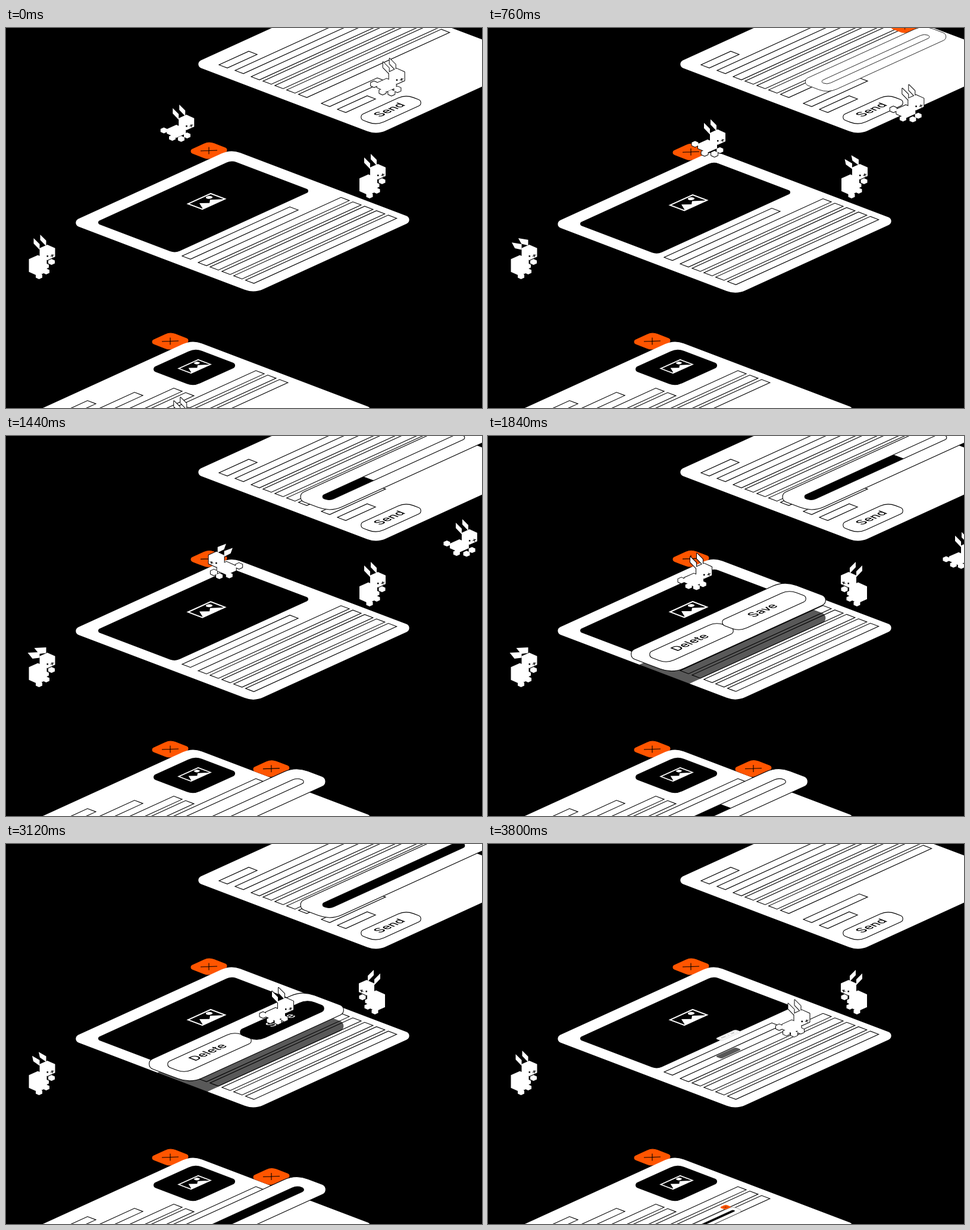
An HTML page with a canvas for the animation above (3.84 s loop, 800 by 640 pixels).

```html
<!DOCTYPE html>
<html lang="en">
<head>
<meta charset="utf-8">
<style>
  html, body { margin: 0; width: 100%; height: 100%; overflow: hidden; background: #000; }
  canvas { display: block; }
</style>
</head>
<body>
<canvas id="stage" width="800" height="640"></canvas>
<script>
const ctx = document.getElementById('stage').getContext('2d');
const LOOP = 3840, STEP = 40, ORANGE = '#ff5500';
// Slopes of the two floor axes: up-right and down-right
const UP = -0.457, DOWN = 0.38;
const TIP = Math.tan((Math.atan(DOWN) - Math.atan(UP)) / 2);

const clamp = v => Math.max(0, Math.min(1, v));
const ramp = (t, a, b) => clamp((t - a) / (b - a));
const easeOut = v => 1 - (1 - v) ** 3;
const mix = (a, b, k) => a + (b - a) * k;
const floor = (a, b) => [a + b, a * UP + b * DOWN];

function paint(path, fill, stroke, width = 1.1) {
  if (fill) { ctx.fillStyle = fill; ctx.fill(path); }
  if (stroke) { ctx.strokeStyle = stroke; ctx.lineWidth = width; ctx.stroke(path); }
}

function at(x, y, scale, draw) {
  ctx.save();
  ctx.translate(x, y);
  ctx.scale(scale, Math.abs(scale));
  draw();
  ctx.restore();
}

function onFloor(x, y, draw) {
  ctx.save();
  ctx.transform(1, UP, 1, DOWN, x, y);
  draw();
  ctx.restore();
}

// Rounded floor rectangle around (x, y); every corner is an arc that starts `cut` px before it
function card(x, y, w, h, cut, fill, stroke, width) {
  const path = new Path2D(), a = w / 2, b = h / 2;
  const corners = [[-a, -b], [a, -b], [a, b], [-a, b]].map(p => floor(...p));
  path.moveTo(x + floor(-a, 0)[0], y + floor(-a, 0)[1]);
  corners.forEach(([px, py], i) => {
    const [nx, ny] = corners[(i + 1) % 4];
    path.arcTo(x + px, y + py, x + nx, y + ny, i % 2 ? cut / TIP : cut * TIP);
  });
  path.closePath();
  paint(path, fill, stroke, width);
  return path;
}

// Text rows, the first with its left corner at (x, y)
function rows(x, y, len, count = 1) {
  const [cx, cy] = floor(len / 2, 7);
  for (let i = 0; i < count; i++) card(x + cx + i * 19.9, y + cy + i * 7.45, len, 14, 0, null, '#000');
}

function polygon(points) {
  const path = new Path2D();
  points.forEach(([x, y]) => path.lineTo(x, y));
  path.closePath();
  return path;
}

function button(text, x, y, w, h, pressed) {
  card(x, y, w, h, 14, pressed ? '#000' : '#fff', '#000');
  onFloor(x - 2, y, () => {
    ctx.font = '500 18px Inter, sans-serif';
    ctx.textAlign = 'center';
    ctx.textBaseline = 'middle';
    ctx.fillStyle = pressed ? '#fff' : '#000';
    ctx.fillText(text, 0, 0);
  });
}

function closeButton(x, y, pressed) {
  card(x, y, 36, 36, 9, pressed ? '#000' : ORANGE, ORANGE);
  if (!pressed) at(x, y, 1, () => paint(new Path2D('M-14 .5L14-.5M0-6V6'), null, '#000'));
}

function pictureIcon(x, y, scale) {
  at(x, y, scale, () => {
    card(0, 0, 38, 24, 0, null, '#fff', 2);
    onFloor(0, 0, () => {
      paint(polygon([[-18, 12], [-9, -3], [-1, 6], [6, 0], [18, 12]]), '#fff');
      ctx.beginPath();
      ctx.arc(10, -5.5, 4, 0, 7);
      ctx.fill();
    });
  });
}

function panel(dx, dy, content, pressed) {
  at(dx, dy, 1, () => {
    closeButton(341, 206.5, pressed);
    card(397.5, 325.5, 272, 311, 17, '#fff');
    content(pressed);
  });
}

function galleryContent() {
  card(331.5, 301, 230, 135, 9, '#000');
  pictureIcon(337, 292, 1);
  rows(296, 384, 181);
  rows(323, 395, 240, 5);
}

function formContent(pressed) {
  rows(152, 329, 50);
  rows(179, 338.5, 240);
  rows(206, 349, 240, 5);
  rows(324, 394, 94);
  rows(351, 404, 50);
  button('Send', 441, 405, 84, 35, pressed);
}

function articleContent() {
  card(381.5, 250.5, 78, 75, 12, '#000');
  pictureIcon(382, 249, 0.86);
  rows(2, 398, 200);
  rows(81, 384, 200);
  rows(147, 377, 200, 2);
  rows(285, 347.5, 200, 3);
}

const popScale = (t, open, close, gone) =>
  easeOut(ramp(t, open, open + 320)) * (1 - ramp(t, close, gone));

function progressPopup(x, y, scale, filled) {
  if (scale <= 0) return;
  at(x, y, scale, () => {
    closeButton(65, -72);
    card(0, 0, 277, 65, 22, '#fff', '#000');
    const bar = card(0, 0, 233, 17, 8.5, '#fff', '#000');
    ctx.clip(bar);
    const rest = 233 * (filled - 1);
    card(...floor(rest / 2, 0), 233 * filled, 17, 0, '#000');
  });
}

function choicePopup(t) {
  const scale = popScale(t, 1440, 3480, 3845);
  if (scale <= 0) return;
  const dip = 3 * ramp(t, 3000, 3080) * (1 - ramp(t, 3140, 3400));
  at(404, 352, scale, () => card(0, 0, 272, 84, 22, 'rgba(0,0,0,.65)'));
  at(404, 322 + dip, scale, () => {
    card(0, 0, 272, 84, 22, '#fff', '#000');
    button('Delete', -62, 26, 121, 38, false);
    button('Save', 60, -28, 121, 38, t >= 3000 && t < 3320);
  });
}

// Silhouette of a block standing on the floor
function block(x, y, rx, ry) {
  const side = ry - rx * 0.45;
  return polygon([[-rx, -side], [0, -ry], [rx, -side], [rx, side], [0, ry], [-rx, side]]
    .map(([a, b]) => [x + a, y + b]));
}

const paw = (x, y) => block(x, y, 5.5, 5);
const head = block(13, -4, 13, 13);

const ear = (x, y, flop) => polygon([
  [x, y], [x, y + 9.5],
  [x - mix(10, 12, flop), y + mix(-1, 11, flop)],
  [x - mix(10, 20, flop), y + mix(-10, 1, flop)]]);

function rabbit(x, y, flip, flop, body) {
  at(x, y, flip ? -1 : 1, () => {
    const parts = [...body, ear(0, -18, flop), ear(11, -24 - 2 * flop, flop), head];
    ctx.lineJoin = 'round';
    parts.forEach(p => paint(p, null, '#000', 2));
    parts.forEach(p => paint(p, '#fff'));
    ctx.fillStyle = '#000';
    ctx.fillRect(12, 1, 2.5, 2.5);
    paint(new Path2D('M18.5 2.5L24 0M20.5-1L22 4'), null, '#000');
  });
}

const sitter = (x, y, flip, flop) =>
  rabbit(x, y, flip, flop, [block(-3, 18, 15, 17.5), paw(20, 12), paw(10, 19), paw(11, 28), paw(-1, 36)]);

// Hops follow one beat; a step is [distance down-right, distance up-right, extra drop]
const BEAT = 665, AIR = 560, FIRST = -215, HEIGHT = 12;

function hopper(t, x, y, steps) {
  const index = Math.min(steps.length - 1, Math.floor((t - FIRST) / BEAT));
  const moves = steps.map(([down, up = 0, drop = 0]) => {
    const [dx, dy] = floor(up, down);
    return [dx, dy + drop];
  });
  moves.slice(0, index).forEach(([dx, dy]) => { x += dx; y += dy; });

  const u = clamp((t - FIRST - index * BEAT) / AIR);
  const back = steps[index][1] < 0;
  const pitch = Math.cos(Math.PI * u), front = (1 - pitch) / 2;
  x += moves[index][0] * u;
  y += moves[index][1] * u - HEIGHT * 4 * u * (1 - u);
  rabbit(x, y, back, back ? 1 - u : 0, [
    block(-4, 11, 16, 11),
    paw(-25, 8 + 4 * pitch),
    paw(mix(-13, -6, front), mix(21, 24, front)),
    paw(mix(0, 13, front), mix(23, 25, front)),
    paw(mix(11, 21, front), 18)]);
}

const stride = [56];
const explorer = [[84, 0, -10], stride, [0, -54], stride, stride, stride, stride];
const sender = [[46], [62, 0, 38], [55, 0, 8], stride, stride];
const reader = [[84, 0, -20], [56, 0, 50], stride];

function render(t) {
  ctx.fillStyle = '#000';
  ctx.fillRect(0, 0, 800, 640);
  const pressed = t >= 380 && t < 720;
  const dip = 5 * ramp(t, 360, 440) * Math.exp(-Math.max(0, t - 440) / 400);

  panel(206, -267, formContent, pressed);
  progressPopup(651.5, 52.5, popScale(t, 640, 3200, 3560), ramp(t, 1070, 2225));
  panel(0, dip, galleryContent, pressed);
  choicePopup(t);
  panel(-65, 321, articleContent);
  progressPopup(381, 632, popScale(t, 1160, 3520, 3910), ramp(t, 1230, 2280));

  hopper(t, 626, 90, sender);
  hopper(t, 258, 166, explorer);
  hopper(t, 260, 663, reader);
  const turned = t >= 1500;
  sitter(turned ? 619 : 612, 246, turned, 0.3 * Math.sin(Math.PI * ramp(t, 200, 1000)));
  sitter(56.5, 382, false, ramp(t, 300, 1000) - ramp(t, 2600, 3300));
}

function tick() {
  render(Math.floor(performance.now() % LOOP / STEP) * STEP);
  requestAnimationFrame(tick);
}
tick();
</script>
</body>
</html>
```
